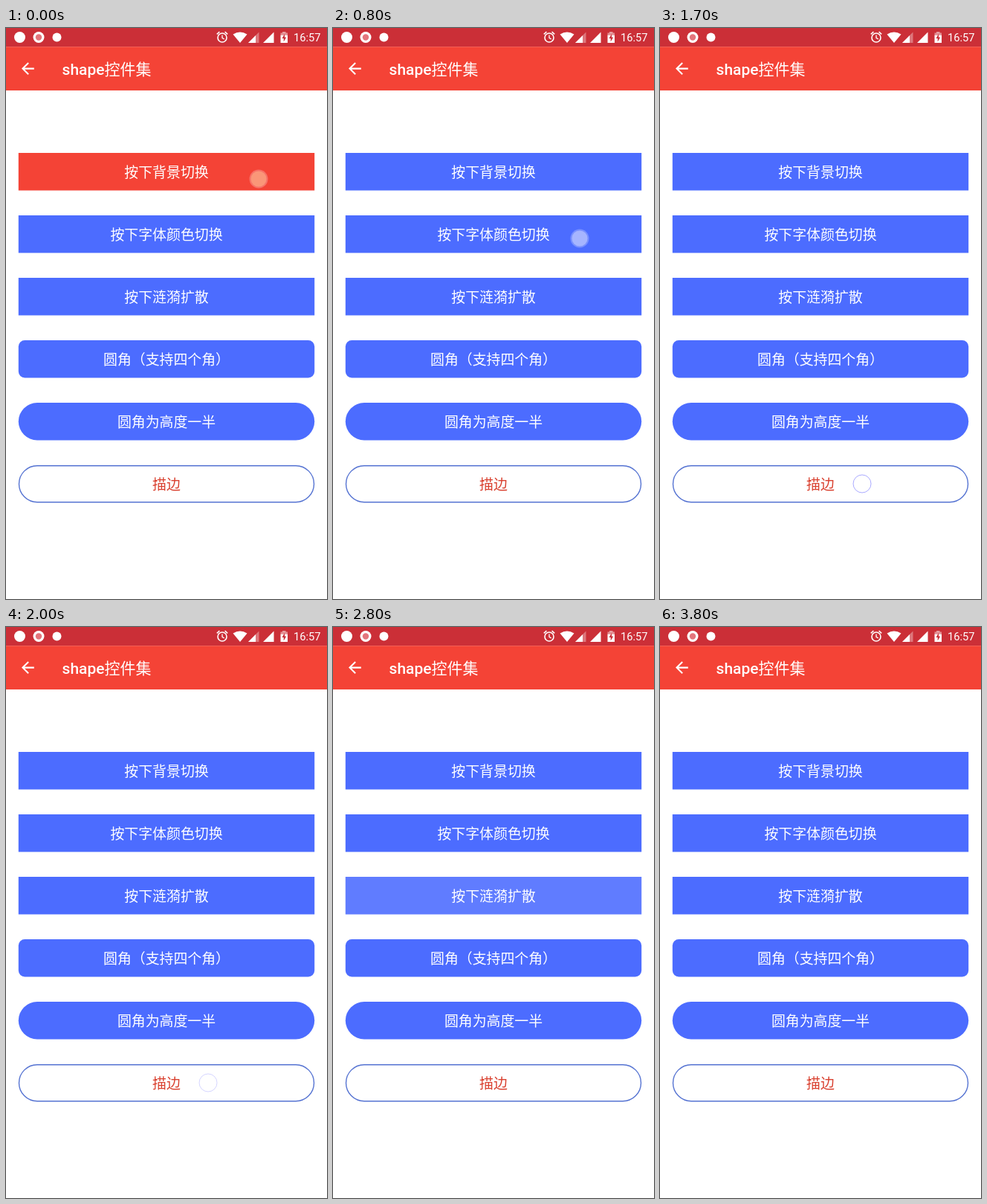
These frames come from a looping animation (432 px wide and 768 px high, 4200 ms). An HTML page with a canvas:

```html
<!DOCTYPE html>
<html lang="zh-CN">
<head>
<meta charset="utf-8">
<title>shape控件集</title>
<style>
  html, body { margin: 0; width: 100%; height: 100%; overflow: hidden; background: #fff; }
  canvas { display: block; width: 432px; height: 768px; }
</style>
</head>
<body>
<canvas id="stage" width="432" height="768"></canvas>
<script>
const ctx = document.getElementById('stage').getContext('2d');
const LOOP = 4200, STEP = 100;
const DP = 1.05; // stage pixels per layout unit
const RED = '#f44336', BAR = '#cb2f37', BLUE = '#4c6cff';
const CJK = '"Noto Sans CJK SC", "Noto Sans CJK", sans-serif';
const LATIN = 'Roboto, sans-serif';
const STATUS = 24 * DP, LEFT = 16 * DP, HEIGHT = 48 * DP;
const WIDTH = 432 - 2 * LEFT, TOP = 160 * DP, PITCH = 80 * DP;

const buttons = [
  { text: '按下背景切换', radius: 0 },
  { text: '按下字体颜色切换', radius: 0 },
  { text: '按下涟漪扩散', radius: 0 },
  { text: '圆角（支持四个角）', radius: 8 * DP },
  { text: '圆角为高度一半', radius: HEIGHT / 2 },
  { text: '描边', radius: HEIGHT / 2, outline: true }
];

// Each touch: position, visible span and fade-out time.
const touches = [
  { x: 340, y: 203, from: 0, to: 200, fade: 100, tint: '255,205,145' },
  { x: 332, y: 283, from: 700, to: 900, fade: 100, tint: '235,235,255' },
  { x: 272, y: 613, from: 1300, to: 1700, fade: 600, ring: true },
  { x: 336, y: 368, from: 2400, to: 2700, fade: 100, tint: '235,235,255' },
  { x: 252, y: 617, from: 3100, to: 3300, fade: 200, ring: true }
];
const ripple = { x: 336, y: 368, from: 2400, grow: 300, to: 2700, fade: 200 };
const backArrow = new Path2D(
  'M20 11H7.83l5.59-5.59L12 4l-8 8 8 8 1.41-1.41L7.83 13H20z');

const during = (t, a, b) => t >= a && t < b;
const clamp = v => Math.max(0, Math.min(1, v));
const presence = (t, o) => t < o.from ? 0 : 1 - clamp((t - o.to) / o.fade);

function disc(x, y, r, color) {
  ctx.fillStyle = color;
  ctx.beginPath();
  ctx.arc(x, y, r, 0, Math.PI * 2);
  ctx.fill();
}

function ring(x, y, r, color, width) {
  ctx.strokeStyle = color;
  ctx.lineWidth = width;
  ctx.beginPath();
  ctx.arc(x, y, r, 0, Math.PI * 2);
  ctx.stroke();
}

function poly(color, ...p) {
  ctx.fillStyle = color;
  ctx.beginPath();
  for (let i = 0; i < p.length; i += 2) ctx.lineTo(p[i], p[i + 1]);
  ctx.closePath();
  ctx.fill();
}

function lines(width, ...p) {
  ctx.strokeStyle = '#fff';
  ctx.lineWidth = width;
  ctx.beginPath();
  for (let i = 0; i < p.length; i += 2) ctx.lineTo(p[i], p[i + 1]);
  ctx.stroke();
}

function label(text, x, y, font, color, align = 'left') {
  ctx.font = font;
  ctx.fillStyle = color;
  ctx.textAlign = align;
  ctx.fillText(text, x, y);
  return ctx.measureText(text).width;
}

function drawStatus() {
  ctx.fillStyle = BAR;
  ctx.fillRect(0, 0, 432, STATUS);
  disc(18.5, 12.5, 7.5, '#fff');
  disc(44, 12.5, 7.5, '#fff');
  disc(44, 12.5, 4.2, '#e4757c');
  disc(68.5, 12.5, 6, '#fff');

  // alarm
  ring(291, 13, 6, '#fff', 1.6);
  lines(1.3, 291, 9.5, 291, 13.3, 293.8, 15);
  lines(1.6, 283.8, 8.3, 287.4, 5.2);
  lines(1.6, 298.2, 8.3, 294.6, 5.2);

  // wifi
  ctx.fillStyle = '#fff';
  ctx.beginPath();
  ctx.moveTo(315, 20);
  ctx.lineTo(305.5, 8.6);
  ctx.quadraticCurveTo(315, 2.5, 324.5, 8.6);
  ctx.closePath();
  ctx.fill();

  // mobile signals
  poly('rgba(255,255,255,.35)', 326, 20, 340.5, 5.5, 340.5, 20);
  poly('#fff', 326, 20, 336, 10, 336, 20);
  poly('#fff', 346, 20, 360.5, 5.5, 360.5, 20);

  // battery
  ctx.fillStyle = 'rgba(255,255,255,.45)';
  ctx.fillRect(372, 5, 4.5, 2);
  ctx.fillRect(369.5, 6.5, 9.5, 3);
  ctx.fillStyle = '#fff';
  ctx.fillRect(369.5, 9.5, 9.5, 10.5);
  poly(BAR, 375, 8, 371.5, 14, 373.7, 14, 373.7, 18.5, 377.2, 12.5, 375, 12.5);

  label('16:57', 387, 18, `${14 * DP}px ${LATIN}`, '#fff');
}

function drawHeader() {
  ctx.fillStyle = RED;
  ctx.fillRect(0, STATUS, 432, 56 * DP);
  ctx.save();
  ctx.translate(LEFT, STATUS + LEFT);
  ctx.scale(DP, DP);
  ctx.fillStyle = '#fff';
  ctx.fill(backArrow);
  ctx.restore();
  const x = 72 * DP, y = 62.5, size = 20 * DP;
  const w = label('shape', x, y, `500 ${size}px ${LATIN}`, '#fff');
  label('控件集', x + w, y, `${size}px ${CJK}`, '#fff');
}

function drawRipple(t) {
  const alpha = presence(t, ripple);
  if (!alpha) return;
  const grown = clamp((t - ripple.from) / ripple.grow);
  disc(ripple.x, ripple.y, 330 * grown, `rgba(255,255,255,${0.22 * alpha})`);
}

function drawButton(b, i, t) {
  const y = TOP + i * PITCH;
  const path = inset => {
    ctx.beginPath();
    ctx.roundRect(LEFT + inset, y + inset, WIDTH - 2 * inset, HEIGHT - 2 * inset,
      Math.max(0, b.radius - inset));
  };
  let color = '#fff';
  if (b.outline) {
    path(0.7);
    ctx.strokeStyle = '#5573d2';
    ctx.lineWidth = 1.4;
    ctx.stroke();
    color = '#d9402f';
  } else {
    path(0);
    ctx.fillStyle = i === 0 && during(t, 0, 200) ? RED : BLUE;
    ctx.fill();
  }
  if (i === 1 && during(t, 900, 1000)) color = RED;
  if (i === 2) {
    ctx.save();
    ctx.clip();
    drawRipple(t);
    ctx.restore();
  }
  label(b.text, 216, y + 32.5, `${18 * DP}px ${CJK}`, color, 'center');
}

function drawTouch(o, t) {
  const a = presence(t, o);
  if (!a) return;
  if (o.ring) {
    ring(o.x, o.y, 12, `rgba(135,135,255,${0.7 * a})`, 1);
  } else {
    disc(o.x, o.y, 12.5, `rgba(255,255,255,${0.25 * a})`);
    disc(o.x, o.y, 10.5, `rgba(${o.tint},${0.4 * a})`);
  }
}

function draw(t) {
  ctx.fillStyle = '#fff';
  ctx.fillRect(0, 0, 432, 768);
  drawStatus();
  drawHeader();
  buttons.forEach((b, i) => drawButton(b, i, t));
  touches.forEach(o => drawTouch(o, t));
}

const start = performance.now();
function tick() {
  const t = (performance.now() - start) % LOOP;
  draw(Math.floor(t / STEP) * STEP);
  requestAnimationFrame(tick);
}
tick();
</script>
</body>
</html>
```
